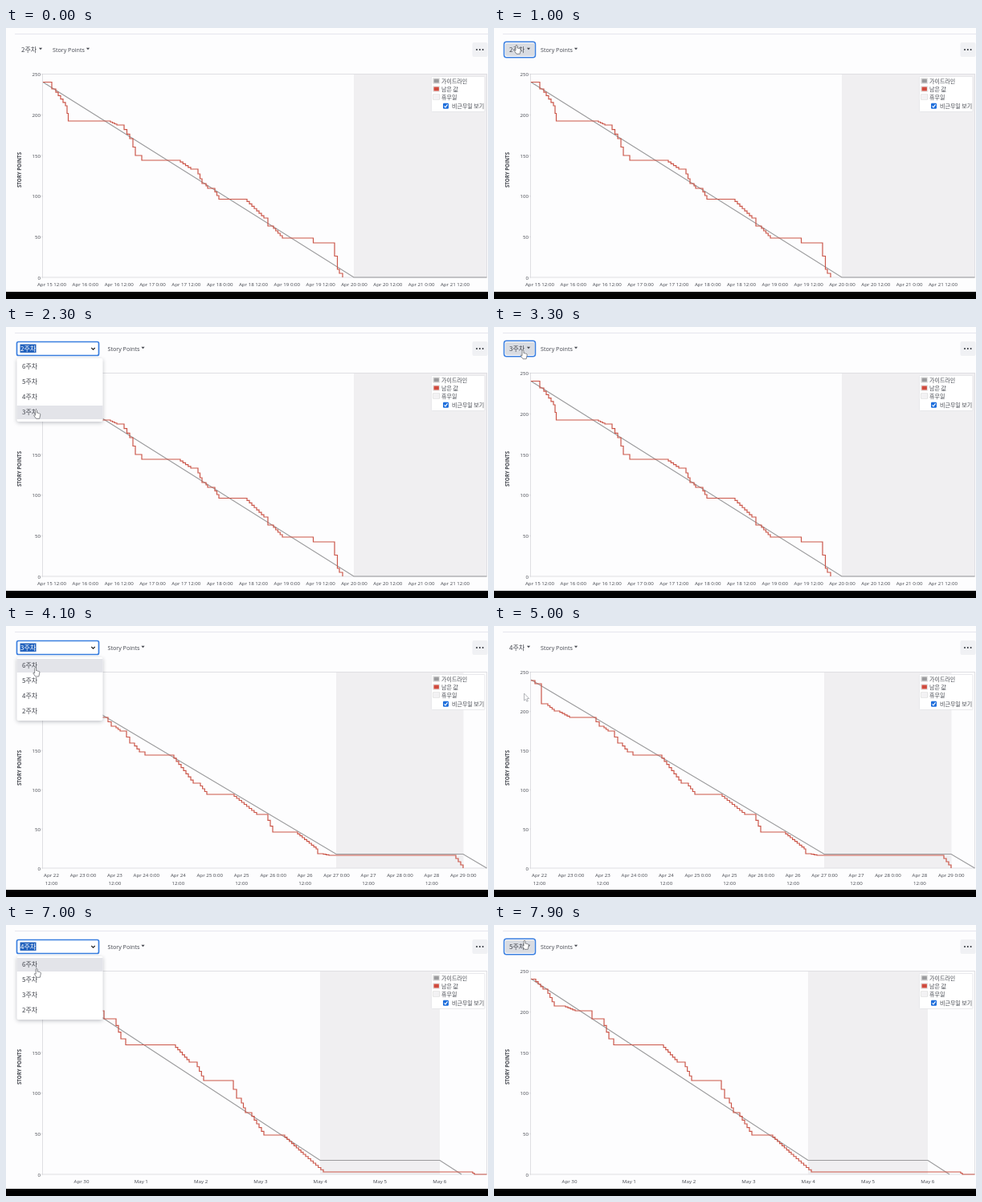
An HTML page with a canvas that plays this animation: 600 px wide and 338 px high, repeating every 8 s.

```html
<!DOCTYPE html>
<html lang="ko">
<head>
<meta charset="utf-8">
<title>Burndown chart</title>
<style>
html, body { margin: 0; width: 100%; height: 100%; overflow: hidden; background: #fdfdfe; }
canvas { display: block; width: 600px; height: 338px; }
</style>
</head>
<body>
<canvas id="stage"></canvas>
<script>
const W = 600, H = 338, LOOP = 8000, STEP = 100;
const LEFT = 46, RIGHT = 598.5, TOP = 57.5;
const LATIN = '"Open Sans", "Noto Sans", sans-serif';
const KOREAN = '"Noto Sans CJK KR", "Noto Sans CJK", "Noto Sans CJK JP", sans-serif';
const RED = '#cb5649', GREY = '#9b9b9d', INK = '#42454d', BLUE = '#3b7fe0';

const canvas = document.getElementById('stage');
const ctx = canvas.getContext('2d');
const dpr = window.devicePixelRatio || 1;
canvas.width = W * dpr;
canvas.height = H * dpr;

const halfDays = (day, count) => Array.from({ length: count },
  (_, i) => `Apr ${day + Math.ceil(i / 2)} ${i % 2 ? '0:00' : '12:00'}`);

// A burst [from x, to x, end y] is a run of even steps; the level holds between bursts
function stairs(startY, endX, bursts) {
  const points = [[LEFT, startY]];
  let y = startY;
  for (const [from, to, endY] of bursts) {
    const n = Math.round((to - from) / 3), drop = (endY - y) / (n + 1);
    for (let i = 0; i <= n; i++) {
      const x = from + (to - from) * i / (n || 1);
      points.push([x, y], [x, y += drop]);
    }
  }
  points.push([endX, y]);
  return points;
}

const charts = [
  {
    base: 311, shade: [433, RIGHT], labels: halfDays(15, 13), first: 57, gap: 41.83,
    guide: [[LEFT, 67.5], [433, 311], [RIGHT, 311]],
    work: stairs(67.5, 419, [[57, 58, 76], [62, 74, 97], [76, 77.5, 116], [130, 138, 121],
      [147, 154, 138], [158, 161, 159], [169, 169, 165], [217, 230, 176], [239, 244, 194],
      [249, 251, 200], [260, 265, 213.5], [300, 321, 237], [326, 327, 247], [333, 344, 262],
      [382.5, 382.5, 268], [409, 412.5, 301], [415, 419, 311]])
  },
  {
    base: 302, shade: [411, 569.5], labels: halfDays(22, 14), first: 56.5, gap: 39.45, wrap: true,
    guide: [[LEFT, 67], [411, 284.5], [569, 284.5], [RIGHT, 302]],
    work: stairs(68, 569, [[51, 52, 72], [59, 59.5, 97], [67, 75, 106], [82, 94, 114],
      [127, 131, 125], [137, 142, 131], [150, 154, 146], [160, 166, 157], [173, 173, 161],
      [209, 233, 196], [242, 250, 210], [284, 312, 235], [326, 332, 257], [363, 386, 278],
      [388, 388, 284], [395, 402, 286], [560, 569, 302]])
  },
  {
    base: 311, shade: [391, 540], first: 94, gap: 74.3,
    labels: ['Apr 30', ...[1, 2, 3, 4, 5, 6].map(d => 'May ' + d)],
    guide: [[LEFT, 67], [391, 293.5], [540, 293.5], [567, 311]],
    work: stairs(67.5, RIGHT, [[52, 61, 80], [67, 75, 101], [89, 101, 107], [122, 123, 117],
      [137, 143, 142], [149, 149, 149.5], [211, 228, 171], [238, 246, 194], [283, 287, 216],
      [293, 298, 234], [306, 321, 262], [347, 370, 286], [373, 395, 308], [581, 583, 311]])
  }
];

// Each round: press the button, open the menu, aim at the next week, pick it
const rounds = [
  { week: 2, at: [28, 21], press: 900, open: 1300, aim: 2000, pick: 2400 },
  { week: 3, at: [36, 28.5], press: 3200, open: 3700, aim: 4600, pick: 5000 },
  { week: 4, at: [40, 22.5], press: 5800, open: 6600, aim: 7200, pick: 7500 },
  { week: 5, at: [38, 19], press: 7800, open: LOOP, aim: LOOP, pick: LOOP }
];
const ENTER = { time: 100, at: [150, 322] };
const chartAt = t => t < 3400 ? 0 : t < 6200 ? 1 : 2;
const rowY = i => 49.3 + 19 * i;
const nextRow = week => [37.5, rowY(5 - week) - 3.3];

function glide(a, b, t, from, to) {
  const u = Math.min(1, Math.max(0, (t - from) / (to - from)));
  const e = u * u * (3 - 2 * u);
  return a.map((v, i) => v + (b[i] - v) * e);
}

function cursorAt(t, i) {
  if (t < ENTER.time) return null;
  const { week, at, press, open, aim } = rounds[i];
  if (t >= open) return glide(at, nextRow(week), t, open, aim);
  const [start, from] = i
    ? [rounds[i - 1].pick, nextRow(rounds[i - 1].week)]
    : [ENTER.time, ENTER.at];
  return glide(from, at, t, start, press);
}

// Drawing helpers
function rect(x, y, w, h, fill) {
  ctx.fillStyle = fill;
  ctx.fillRect(x, y, w, h);
}

function box(x, y, w, h, r, fill, stroke, width = 1) {
  ctx.beginPath();
  ctx.roundRect(x, y, w, h, r);
  if (fill) { ctx.fillStyle = fill; ctx.fill(); }
  if (stroke) { ctx.strokeStyle = stroke; ctx.lineWidth = width; ctx.stroke(); }
}

function text(s, x, y, size, { font = LATIN, align = 'left', color = INK, weight = 400 } = {}) {
  ctx.font = `${weight} ${size}px ${font}`;
  ctx.textAlign = align;
  ctx.textBaseline = 'alphabetic';
  ctx.fillStyle = color;
  ctx.fillText(s, x, y + size * 0.36);
}

const korean = (s, x, y, size, color = INK) => text(s, x, y, size, { font: KOREAN, color });

function line(points, color, width) {
  ctx.beginPath();
  points.forEach(([x, y]) => ctx.lineTo(x, y));
  ctx.strokeStyle = color;
  ctx.lineWidth = width;
  ctx.stroke();
}

function polygon(points, fill) {
  ctx.beginPath();
  points.forEach(([x, y]) => ctx.lineTo(x, y));
  ctx.closePath();
  ctx.fillStyle = fill;
  ctx.fill();
}

const caret = (x, y) => polygon([[x - 2.1, y - 1.2], [x + 2.1, y - 1.2], [x, y + 1.3]], INK);

function drawChart({ base, shade, guide, work, labels, first, gap, wrap }) {
  rect(shade[0], TOP, shade[1] - shade[0], base - TOP, '#f0eff1');
  ctx.strokeStyle = '#dfdfe3';
  ctx.lineWidth = 1;
  ctx.strokeRect(LEFT - 0.5, TOP, RIGHT - LEFT + 0.5, base - TOP);

  for (let v = 0; v <= 250; v += 50) {
    const y = base - (base - TOP) * v / 250;
    text(String(v), 43, y + 0.5, 6.1, { align: 'right' });
    line([[43.8, y], [LEFT, y]], '#d8d8dc', 0.8);
  }
  labels.forEach((label, i) => {
    const parts = wrap && i % 2 === 0 ? [label.slice(0, 6), label.slice(7)] : [label];
    parts.forEach((part, row) =>
      text(part, first + gap * i, base + 9 + row * 9.3, 6.15, { align: 'center' }));
  });

  ctx.save();
  ctx.translate(17, 177);
  ctx.rotate(-Math.PI / 2);
  text('STORY POINTS', 0, 0, 6.2, { align: 'center', weight: 700 });
  ctx.restore();

  line(guide, GREY, 1.2);
  line(work, RED, 1.2);
}

function drawLegend() {
  box(529.5, 60.5, 66.5, 44, 1, '#fff', '#e4e4e8', 0.8);
  [['가이드라인', GREY], ['남은 값', '#cf4b3e'], ['휴무일', '#f2f1f3']].forEach(([name, color], i) => {
    const y = 66 + i * 10;
    box(531.7, y - 3.2, 8, 6.4, 0, '#fff', '#ccc', 0.6);
    rect(532.5, y - 2.5, 6.4, 5, color);
    korean(name, 542, y, 7);
  });
  box(544, 93.7, 7, 7, 1.2, '#1f6fdc');
  line([[545.5, 97.3], [547, 98.9], [549.6, 95.4]], '#fff', 1.1);
  korean('비근무일 보기', 555, 97.8, 7);
}

function drawMenu(week, cursor) {
  box(13.5, 18.5, 102, 17, 2, '#fff', BLUE, 1.7);
  rect(17.5, 21.5, 20, 10.5, '#2362bd');
  korean(`${week}주차`, 18, 27, 8, '#fff');
  line([[106.3, 26], [108.5, 28.2], [110.7, 26]], '#222', 1.2);

  ctx.save();
  ctx.shadowColor = 'rgba(30,35,50,.28)';
  ctx.shadowBlur = 5 * dpr;
  ctx.shadowOffsetY = 1.5 * dpr;
  box(13.5, 39, 107, 79, 2, '#fff');
  ctx.restore();

  const active = Math.floor((cursor[1] - 41) / 19);
  [6, 5, 4, 3, 2].filter(n => n !== week).forEach((n, i) => {
    if (i === active) rect(13.5, rowY(i) - 8.3, 107, 17, '#e3e4e9');
    korean(`${n}주차`, 20, rowY(i), 8);
  });
}

function drawButton(week, focused, hovered) {
  if (focused) {
    box(14, 19, 36.5, 16, 2, '#d9dce2');
    box(12.5, 17.3, 39, 19.4, 3, null, BLUE, 1.5);
  } else if (hovered) {
    box(13, 18, 38, 18, 2, '#e8eaee');
  }
  korean(`${week}주차`, 19, 27, 8);
  caret(43, 26);
}

function drawHand(x, y) {
  ctx.save();
  ctx.translate(x, y);
  ctx.beginPath();
  ctx.moveTo(-1, 1);
  ctx.quadraticCurveTo(0, -0.8, 1, 1);
  ctx.lineTo(1, 4.2);
  ctx.quadraticCurveTo(2, 3.4, 2.7, 4.6);
  ctx.quadraticCurveTo(3.6, 4, 4.2, 5.1);
  ctx.quadraticCurveTo(5.3, 4.9, 5.3, 6.2);
  ctx.lineTo(4.2, 11.3);
  ctx.lineTo(0, 11.3);
  ctx.lineTo(-2.8, 7.4);
  ctx.quadraticCurveTo(-3, 5.8, -1, 7.2);
  ctx.closePath();
  ctx.fillStyle = '#fff';
  ctx.fill();
  ctx.strokeStyle = '#6a6c72';
  ctx.lineWidth = 0.8;
  ctx.stroke();
  ctx.restore();
}

function drawArrow(x, y) {
  ctx.save();
  ctx.translate(x, y);
  const shape = [[0, 0], [0, 9], [2, 7.2], [3.4, 10.2], [4.8, 9.6], [3.5, 6.7], [6.2, 6.5]];
  polygon(shape, '#fff');
  line([...shape, shape[0]], '#a0a2a8', 0.8);
  ctx.restore();
}

function draw(t) {
  const i = rounds.findIndex(r => t < r.pick);
  const { week, press, open } = rounds[i];
  const isOpen = t >= open, cursor = cursorAt(t, i);
  const onButton = cursor && cursor[0] < 52 && cursor[1] > 17 && cursor[1] < 36;

  ctx.setTransform(dpr, 0, 0, dpr, 0, 0);
  rect(0, 0, W, H, '#fdfdfe');
  rect(11, 7, 589, 1, '#e6e6ee');

  drawChart(charts[chartAt(t)]);
  drawLegend();

  const shift = isOpen ? 68.5 : 0;
  text('Story Points', 58 + shift, 27, 7.15);
  caret(102 + shift, 26);
  box(580.5, 18, 19, 18, 2, '#f0f1f4');
  for (const x of [586, 589.8, 593.6]) box(x - 1, 26, 2, 2, 1, '#30333b');

  if (isOpen) drawMenu(week, cursor);
  else drawButton(week, t >= press, onButton);

  if (cursor) (onButton || isOpen ? drawHand : drawArrow)(...cursor);
  rect(0, 329, W, 9, '#000');
}

function tick() {
  const t = performance.now() % LOOP;
  draw(Math.floor(t / STEP) * STEP);
  requestAnimationFrame(tick);
}
tick();
</script>
</body>
</html>
```
